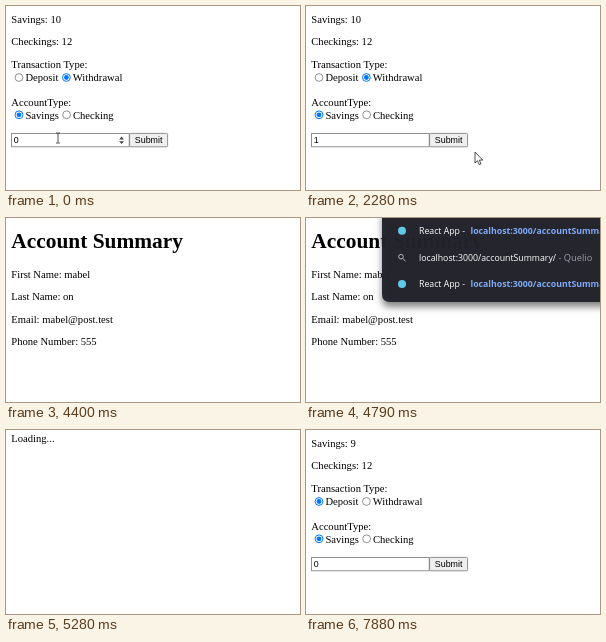
These frames come from a looping animation (294x184 px, 8000 ms). An HTML page:

```html
<!DOCTYPE html>
<html lang="en">
<head>
<meta charset="utf-8">
<title>Account form</title>
<style>
html, body { margin: 0; width: 100%; height: 100%; overflow: hidden; background: #fff; }
svg { display: block; width: 294px; height: 184px; }
text { font: 10.6px "Liberation Serif", "Times New Roman", serif; white-space: pre; }
.title { font-size: 21.4px; font-weight: bold; }
.ui { font: 8.9px "Liberation Sans", Arial, sans-serif; }
#menu text { font: 8.75px "Open Sans", "Noto Sans", sans-serif; fill: #fff; }
#menu .url { font-weight: bold; fill: #7faaf6; }
#menu .hint { font-size: 9.3px; fill: #9aa0a6; }
.ring { fill: #fff; stroke: #767676; stroke-width: .8; }
.on .ring { stroke: #0075ff; stroke-width: 1; }
.dot { fill: none; }
.on .dot { fill: #0075ff; }
</style>
</head>
<body>
<svg viewBox="0 0 294 184">
  <defs>
    <filter id="shade" x="-10%" y="-10%" width="120%" height="140%">
      <feDropShadow dx="0" dy="5" stdDeviation="3.5" flood-opacity=".5"/>
    </filter>
  </defs>

  <g id="form">
    <text id="savings" x="5.3" y="17"></text>
    <text x="5.3" y="39.3">Checkings: 12</text>
    <text x="5.3" y="62">Transaction Type:</text>
    <text x="5.3" y="99.7">AccountType:</text>
    <g id="radios"></g>
    <rect id="field" fill="#fff"/>
    <rect id="mark" x="7.6" y="129.5" width="5.2" height="9.5" fill="#0078d7"/>
    <text id="value" class="ui" x="7.8" y="137.4"></text>
    <path id="caret" d="M13.3 129.5v9" stroke="#000" stroke-width=".7"/>
    <path id="spin" d="M113.2 133.4l2.4-2.8 2.4 2.8zM113.2 135.2l2.4 2.8 2.4-2.8z" fill="#444"/>
    <rect id="button" x="123.6" y="127.4" width="38" height="13.4" rx="1" stroke="#767676" stroke-width=".8"/>
    <text class="ui" x="142.6" y="137.4" text-anchor="middle">Submit</text>
  </g>

  <text id="loading" x="5.3" y="11.7">Loading...</text>

  <g id="summary">
    <text class="title" x="5.3" y="30">Account Summary</text>
    <text x="5.3" y="60">First Name: mabel</text>
    <text x="5.3" y="82.4">Last Name: on</text>
    <text x="5.3" y="104.8">Email: mabel@post.test</text>
    <text x="5.3" y="127.4">Phone Number: 555</text>
  </g>

  <g id="menu">
    <path d="M76-6V76q0 8 8 8H310V-6z" fill="#22252a" fill-opacity=".97" filter="url(#shade)"/>
    <circle cx="96" cy="12.7" r="4" fill="#61c8e8"/>
    <text x="113" y="16">React App - <tspan class="url" x="164.5">localhost:3000/accountSummary</tspan></text>
    <g fill="none" stroke="#b5b9be" stroke-width="1">
      <circle cx="95" cy="38.7" r="2.3"/>
      <path d="M96.8 40.5l2.7 2.7"/>
    </g>
    <text x="113" y="42.7">localhost:3000/accountSummary/<tspan class="hint" x="250"> - Quelio</tspan></text>
    <circle cx="96" cy="66" r="4" fill="#61c8e8"/>
    <text x="113" y="69.3">React App - <tspan class="url" x="164.5">localhost:3000/accountSummary</tspan></text>
  </g>

  <g id="pointer">
    <path id="arrow" d="M0 0v11l2.5-2.3 1.7 4 1.8-.8-1.7-3.8h3.4z" fill="#fff" stroke="#222" stroke-width=".8"/>
    <path id="beam" d="M-2-5h1.4l.6.5.6-.5H2M0-4.5v9M-2 5h1.4l.6-.5.6.5H2" fill="none" stroke="#222" stroke-width=".8"/>
  </g>
</svg>
<script>
const LOOP = 8000;
const $ = id => document.getElementById(id);
const show = (id, on) => $(id).setAttribute('display', on ? 'inline' : 'none');
const within = (t, a, b) => t >= a && t < b;
const setAll = (el, attrs) => { for (const k in attrs) el.setAttribute(k, attrs[k]); };

const radio = (id, x, y, label) => `<g id="${id}">
  <circle class="ring" cx="${x}" cy="${y}" r="3.9"/><circle class="dot" cx="${x}" cy="${y}" r="2.4"/>
  <text x="${x + 6.4}" y="${y + 3.8}">${label}</text></g>`;
$('radios').innerHTML =
  radio('deposit', 13, 71.5, 'Deposit') + radio('withdraw', 60.4, 71.5, 'Withdrawal') +
  radio('fromSavings', 13, 108.8, 'Savings') + radio('fromChecking', 60.6, 108.8, 'Checking');
$('fromSavings').classList.add('on');

// pointer path: time, x, y
const path = [
  [0, 52, 132], [90, 52, 132], [400, 3, 131], [740, 3, 131], [870, 235, 168], [960, 181, 151],
  [1010, 181, 151], [1110, 140, 127], [1540, 140, 127], [1750, 150, 164], [1970, 150, 130],
  [2120, 150, 130], [2250, 169, 146], [2430, 169, 146], [2590, 145, 131], [2750, 145, 131], [2990, 152, 152]
];

function pointerAt(t) {
  const i = Math.max(1, path.findIndex(p => p[0] >= t));
  const [t0, x0, y0] = path[i - 1], [t1, x1, y1] = path[i];
  const k = (t - t0) / (t1 - t0);
  return [x0 + (x1 - x0) * k, y0 + (y1 - y0) * k];
}

function drawPointer(t) {
  const visible = t < 2990;
  show('pointer', visible);
  if (!visible) return false;
  const [x, y] = pointerAt(t);
  const inField = x > 5 && x < 123 && y > 127 && y < 141 && t < 2750;
  $('pointer').setAttribute('transform', `translate(${x} ${y})`);
  show('arrow', !inField);
  show('beam', inField);
  return inField;
}

function drawForm(t, hover) {
  const fresh = t >= 5650, focus = within(t, 90, 1290), typed = within(t, 720, 2750);
  const marked = within(t, 320, 720);
  const pressed = within(t, 1290, 1350) || within(t, 2430, 2590);
  $('savings').textContent = 'Savings: ' + (fresh ? 9 : 10);
  $('deposit').classList.toggle('on', fresh);
  $('withdraw').classList.toggle('on', !fresh);
  $('value').textContent = typed ? '1' : '0';
  $('value').style.fill = marked ? '#fff' : '#000';
  setAll($('field'), focus
    ? { x: 5.8, y: 127.4, width: 116.8, height: 13.2, rx: 1, stroke: '#101010', 'stroke-width': 1.6 }
    : { x: 5.6, y: 127.4, width: 117.6, height: 13.4, rx: 0, stroke: '#767676', 'stroke-width': .8 });
  $('button').setAttribute('fill', pressed ? '#dcdcdc' : '#efefef');
  show('mark', marked);
  show('caret', focus && !marked && t < 1220);
  show('spin', hover || focus);
}

function frame(now) {
  const t = now % LOOP;
  const form = t < 2750 || t >= 5650;
  const hover = drawPointer(t);
  show('form', form);
  show('loading', within(t, 2750, 3130) || within(t, 5120, 5650));
  show('summary', within(t, 3130, 5120));
  show('menu', within(t, 4790, 5040));
  if (form) drawForm(t, hover);
  requestAnimationFrame(frame);
}
frame(0);
</script>
</body>
</html>
```
